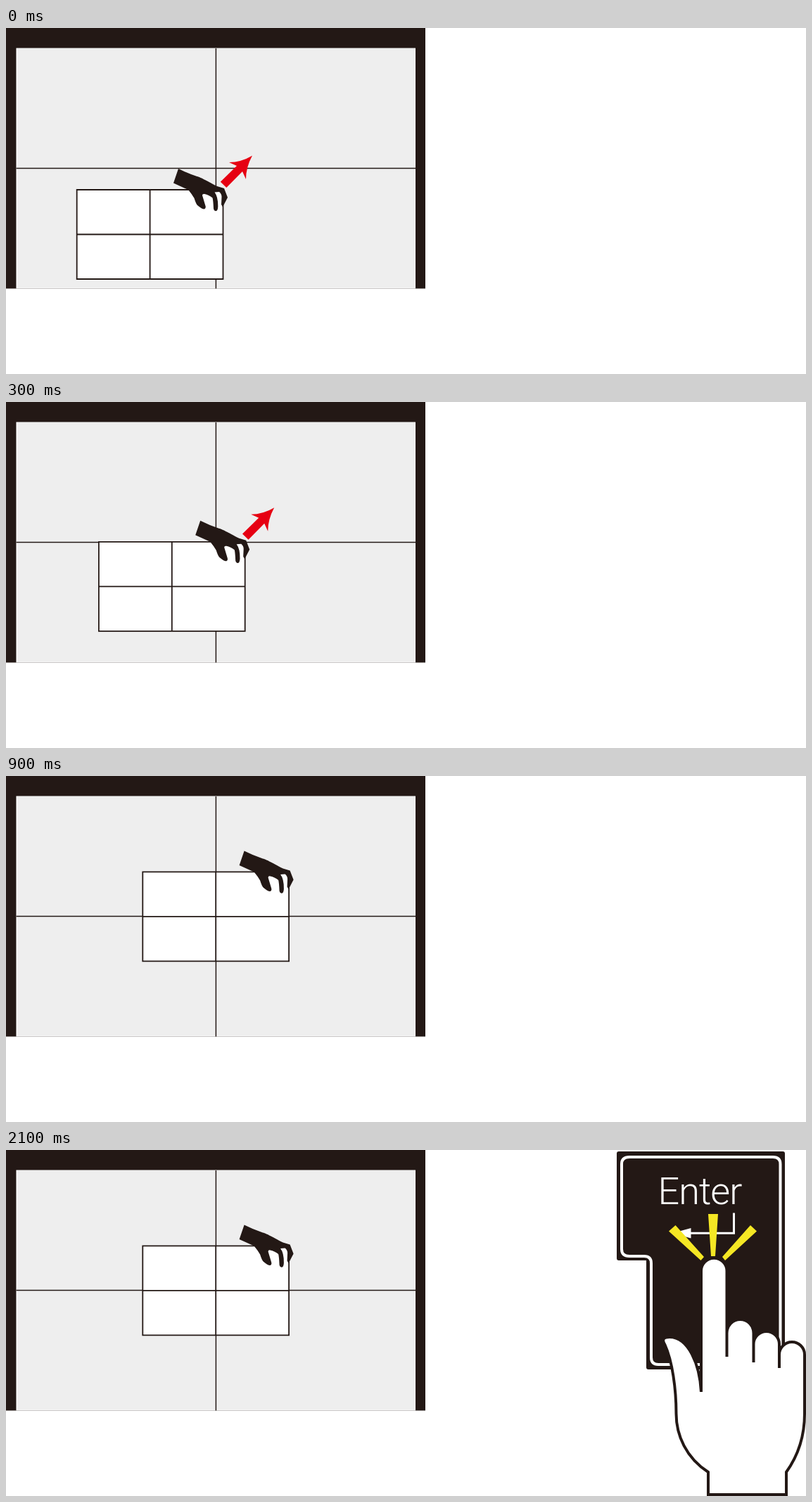
Animation, 1137 px wide and 492 px high, one loop 4100 ms. Source, as an HTML page:

```html
<!DOCTYPE html>
<html lang="en">
<head>
<meta charset="utf-8">
<title>Align and press Enter</title>
<style>
  html, body { margin: 0; width: 100%; height: 100%; overflow: hidden; background: #fff; }
  svg { display: block; }
  .ink { fill: #231815; }
  .line { fill: none; stroke: #231815; }
  text { font: 300 54px Roboto, sans-serif; letter-spacing: -1px; fill: #fff; }
</style>
</head>
<body>
<svg width="1137" height="492" viewBox="0 0 1137 492">
  <path class="ink" d="M0 0H596V370.5H0Z"/>
  <path fill="#fff" d="M14.5 28.5H582V370.5H14.5Z"/>
  <path fill="#eee" d="M16 29H581V369.5H16Z"/>
  <path class="line" stroke-width="1.5" d="M298.4 29V370.5M14.5 199.5H582"/>

  <g id="sheet">
    <path class="line" style="fill:#fff" stroke-width="1.8" d="M100.7 230H308.5V357H100.7ZM204.6 230V357M100.7 293.5H308.5"/>
    <path class="ink" d="M245 200L238 220.5L259 230Q264 236 267.5 242Q270 250 272 252Q279 258 282 257.5Q284.5 256 283.5 253L279 238Q279 235.500 282 236Q288 237 293.500 241.500Q294.500 245 295 257Q296 260.500 298.500 260.300Q301 260 301.300 254Q301.500 240 296.500 233.500L303 233Q306.500 236 306.500 240L306 251L308 254.500L315 241L310 228L300 225C283 216 277 212.500 270 210.500Q258 206.500 245 200Z"/>
    <path id="arrow" fill="#e60012" d="M350 181.500Q334 191 317 191L328 196L304.800 218.800L313.300 227L336 204L341 215Q341 198 350 181.500Z"/>
  </g>

  <g id="key">
    <path class="ink" d="M871 2H1104Q1107 2 1107 5V309Q1107 312 1104 312H913Q910 312 910 309V157H871Q868 157 868 154V5Q868 2 871 2Z"/>
    <path fill="none" stroke="#fff" stroke-width="4" d="M886 10H1090Q1100.500 10 1100.500 20V295Q1100.500 305 1090 305H927Q917 305 917 295V161Q917 151 907 151H886Q875 151 875 141V20Q875 10 886 10Z"/>
    <text x="926.500" y="76.500">Enter</text>
    <path fill="none" stroke="#fff" stroke-width="3" d="M1034.500 89.500V118.300H972"/>
    <path fill="#fff" d="M947 118.300L973.500 111V125.500Z"/>
  </g>

  <path id="rays" fill="#f5e724" d="M998 91H1012L1008 151H1002ZM942 115.500L951.500 107L992 152L987.500 157ZM1058 107L1067 115.500L1022 157L1018 152Z"/>
  <path id="hand" class="line" style="fill:#fff" stroke-width="4" stroke-linejoin="miter" d="M988 344V172a18 18 0 0 1 36.500 0V294V260.500a19 19.500 0 0 1 38 0V302V276a18.200 18 0 0 1 36.500 0V310V291a18 18 0 0 1 36 0V375C1135 410 1124 437 1109 458V490H998V458C967 438 952.500 406 952.500 375C952.500 340 947 300 936.500 277C932 270 934 266 943 266C970 266 986 305 988 344"/>
</svg>
<script>
const get = id => document.getElementById(id);
const show = (id, on) => get(id).style.display = on ? '' : 'none';

function draw(now) {
  const step = Math.floor(now % 4100 / 100);
  const shift = Math.min(step, 9) * 10.4;
  get('sheet').setAttribute('transform', `translate(${shift} ${-shift})`);
  show('arrow', step < 9);
  show('key', step >= 10);
  show('hand', step >= 20);
  show('rays', step >= 21);
}

let start;
function tick(now) {
  start ??= now;
  draw(now - start);
  requestAnimationFrame(tick);
}
draw(0);
requestAnimationFrame(tick);
</script>
</body>
</html>
```
